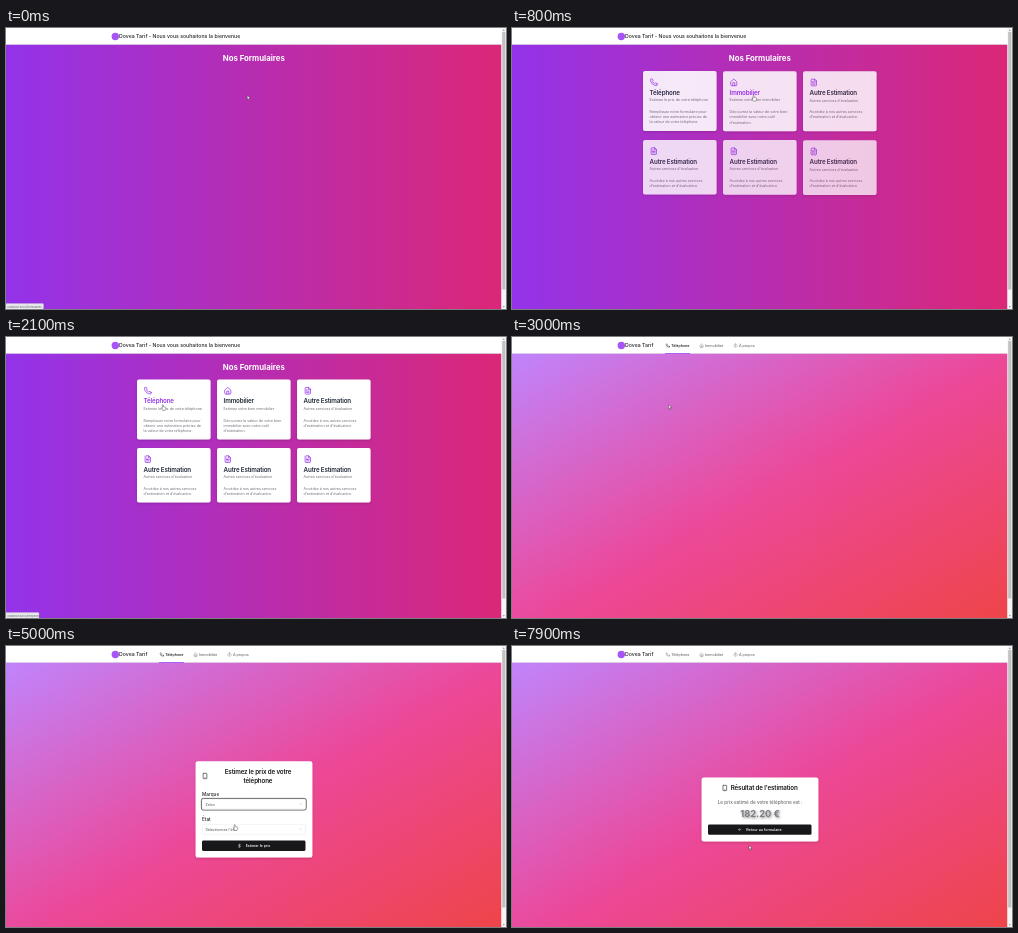
An HTML page for the animation above (8 s loop, 500 by 281 pixels).

```html
<!DOCTYPE html>
<html lang="fr">
<head>
<meta charset="utf-8">
<title>Formulaires d'estimation</title>
<style>
  html, body { margin: 0; width: 100%; height: 100%; overflow: hidden; background: #fff; }
  svg { display: block; width: 100%; height: 100%; font-family: Inter, "Open Sans", sans-serif; }
  text { white-space: pre; }
</style>
</head>
<body>
<svg viewBox="0 0 500 281">
  <defs>
    <linearGradient id="home" gradientUnits="userSpaceOnUse" x1="0" y1="0" x2="495.5" y2="0">
      <stop stop-color="#9333ea"/><stop offset="1" stop-color="#db2777"/>
    </linearGradient>
    <linearGradient id="form" gradientUnits="userSpaceOnUse" x1="127.2" y1="-55.1" x2="368.4" y2="370.1">
      <stop stop-color="#c084fc"/><stop offset=".5" stop-color="#ec4899"/><stop offset="1" stop-color="#ef4444"/>
    </linearGradient>
    <filter id="shade" x="-20%" y="-20%" width="140%" height="150%">
      <feDropShadow dx="0" dy="1" stdDeviation="1" flood-opacity=".18"/>
    </filter>
    <filter id="glow" x="-20%" y="-30%" width="140%" height="180%">
      <feDropShadow dx=".8" dy="1.1" stdDeviation=".8" flood-opacity=".5"/>
    </filter>
  </defs>
  <g id="scene"></g>
</svg>
<script>
const LOOP = 8000;
const INK = '#18181b', GREY = '#71717a', PURPLE = '#9333ea';
const SITE = 'Dovea Tarif';
const BRANDS = ['Zelvo', 'Norvik', 'Tamiro', 'Quelda', 'Brenoa', 'Fylos', 'Ormika', 'Pavely', 'Suneko', 'Lirox', 'Autre'];
const STATES = ['Neuf', 'Occasion', 'Bon état', 'Abîmé'];
const scene = document.getElementById('scene');

const clamp = x => Math.max(0, Math.min(1, x));
const easeOut = x => 1 - (1 - clamp(x)) ** 2;
const easeInOut = x => (x = clamp(x), x * x * (3 - 2 * x));
const during = (t, a, b) => t >= a && t < b;

// y is the vertical middle of the capitals
function label(str, x, y, size, { fill = INK, weight = 400, anchor = 'start', extra = '' } = {}) {
  return `<text x="${x}" y="${y + size * .36}" font-size="${size}" font-weight="${weight}" fill="${fill}" text-anchor="${anchor}" ${extra}>${str}</text>`;
}
const heading = (str, x, y, anchor, fill = '#1f2937') =>
  label(str, x, y, 6.25, { fill, anchor, weight: 600, extra: 'letter-spacing="-.156"' });
const rect = (x, y, w, h, fill, r = 0, extra = '') =>
  `<rect x="${x}" y="${y}" width="${w}" height="${h}" rx="${r}" fill="${fill}" ${extra}/>`;
const group = (content, opacity = 1, dy = 0) =>
  `<g opacity="${opacity}" transform="translate(0 ${dy})">${content}</g>`;
const rise = (content, p) => group(content, p, 5 * (1 - p));

// Icons live on a 24-unit grid and are placed by their centre
const ICONS = {
  phone: 'M22 17v3a2 2 0 0 1-2 2A18 18 0 0 1 2 4a2 2 0 0 1 2-2h3a2 2 0 0 1 2 2l1 4-2 2a16 16 0 0 0 6 6l2-2 4 1a2 2 0 0 1 2 2z',
  house: 'M3 10 12 2l9 8v10a2 2 0 0 1-2 2H5a2 2 0 0 1-2-2zM9 22v-9h6v9',
  file: 'M14 2H6a2 2 0 0 0-2 2v16a2 2 0 0 0 2 2h12a2 2 0 0 0 2-2V8zV8h6M8 13h8M8 17h8M8 9h2',
  info: 'M12 2a10 10 0 1 0 .01 0M12 11v6M12 7v.5',
  mobile: 'M7 2h10a2 2 0 0 1 2 2v16a2 2 0 0 1-2 2H7a2 2 0 0 1-2-2V4a2 2 0 0 1 2-2M12 18h.1',
  chevron: 'm6 9 6 6 6-6',
  dollar: 'M12 2v20M17 5H9.500a3.500 3.500 0 0 0 0 7h5a3.500 3.500 0 0 1 0 7H6',
  back: 'M12 5l-7 7 7 7M5 12h14'
};
function icon(name, x, y, size, color) {
  const k = size / 24;
  return `<path d="${ICONS[name]}" transform="translate(${x - size / 2} ${y - size / 2}) scale(${k})" fill="none" stroke="${color}" stroke-width="2.200" stroke-linecap="round" stroke-linejoin="round"/>`;
}

function frame(fill, title) {
  return rect(0, 0, 500, 281, '#fff') + rect(0, 16.5, 495.5, 264.5, `url(#${fill})`) +
    rect(0, 16.2, 495.5, .6, '#d9d5e0') +
    '<circle cx="109.300" cy="8.500" r="3.700" fill="#a855f7"/>' +
    label(title, 113, 8.6, 5.2, { weight: 500, fill: '#27272a' });
}

const scrollbar = () => rect(495.5, 0, 4.5, 281, '#f4f4f4') + rect(496.2, 4, 3.2, 257.5, '#c1c1c1') +
  '<path d="M496.800 2.800h2l-1-1.300zM496.800 278.200h2l-1 1.300z" fill="#777"/>';

const status = (path, w) => rect(-1, 275.6, w + 1, 6.4, '#e6e8eb', .8, 'stroke="#b8bbc0" stroke-width=".300"') +
  label('localhost:3000/' + path, 1.4, 278.6, 2.7, { fill: '#5f6368' });

const OTHER = ['file', 'Autre Estimation', 'Autres services d\'évaluation',
  ['Accédez à nos autres services', 'd\'estimation et d\'évaluation.']];
const CARDS = [
  ['phone', 'Téléphone', 'Estimez le prix de votre téléphone',
    ['Remplissez notre formulaire pour', 'obtenir une estimation précise de', 'la valeur de votre téléphone.']],
  ['house', 'Immobilier', 'Estimez votre bien immobilier',
    ['Découvrez la valeur de votre bien', 'immobilier avec notre outil', 'd\'estimation.']],
  OTHER, OTHER, OTHER, OTHER
];

function card([glyph, title, intro, lines], i, hovered) {
  const x = 131 + 80 * (i % 3), row = i > 2, y = row ? 111 : 42.5;
  return rect(x, y, 73.6, row ? 54.6 : 60, '#fff', 2, 'filter="url(#shade)"') +
    icon(glyph, x + 10.8, y + 11.2, 8, PURPLE) +
    heading(title, x + 6.6, y + 21.4, 'start', hovered ? PURPLE : undefined) +
    label(intro, x + 6.6, y + 29, 3.65, { fill: GREY }) +
    lines.map((s, n) => label(s, x + 6.6, y + 40.7 + 5.2 * n, 3.65, { fill: GREY })).join('');
}

function homePage(t) {
  const hovered = during(t, 300, 1350) ? 1 : t >= 1650 ? 0 : -1;
  let out = frame('home', SITE + ' - Nous vous souhaitons la bienvenue') +
    label('Nos Formulaires', 247.8, 30, 7.8, { fill: '#fff', weight: 700, anchor: 'middle' });
  CARDS.forEach((c, i) => {
    out += rise(card(c, i, i === hovered), easeOut((t - 330 - 25 * i) / 700));
  });
  if (t < 150) out += status('formulaires', 37.5);
  else if (during(t, 1000, 1400)) out += status('immobilier', 35);
  else if (t >= 1900) out += status('telephone', 33);
  return out + scrollbar();
}

function nav(active) {
  const tab = (glyph, str, x, on) => icon(glyph, x, 8.6, 4.2, on ? INK : GREY) +
    label(str, x + 3.4, 8.6, 3.65, { weight: 500, fill: on ? INK : GREY });
  return tab('phone', 'Téléphone', 155.8, active) + tab('house', 'Immobilier', 189.6) +
    tab('info', 'À propos', 223.5) + (active ? rect(153, 16, 25, .9, '#a855f7') : '');
}

function select(title, value, y, focused) {
  return label(title, 196, y - 10.1, 4.7, { weight: 500, fill: '#27272a' }) +
    (focused ? rect(195.4, y - 5.8, 104.8, 11.6, '#fff', 1.9, `stroke="${INK}" stroke-width=".700"`) : '') +
    rect(196.2, y - 5, 103.2, 10, '#fff', 1.4, 'stroke="#e0e0e4" stroke-width=".400"') +
    label(value, 199.4, y, 3.65, { fill: '#52525b' }) + icon('chevron', 294.6, y, 3.8, '#a1a1aa');
}

function button(glyph, str, y, iconX, textX, fill) {
  return rect(196, y - 5.2, 103.5, 10.4, fill, 1.4) + icon(glyph, iconX, y, 4, '#fff') +
    label(str, textX, y, 3.65, { fill: '#fff', weight: 500, anchor: 'middle' });
}

function menu(items, y, h, active, t, opens, closes) {
  if (!during(t, opens, closes + 120)) return '';
  const p = clamp((t - opens) / 150) * (1 - clamp((t - closes) / 120));
  const k = .95 + .05 * p, cy = y + h / 2;
  const rows = items.map((s, i) => {
    const ry = y + 5.2 + 8.3 * i;
    return (i === active ? rect(197, ry - 4.1, 101.500, 8.2, '#f4f4f5', 1) : '') +
      label(s, 206.5, ry, 3.65, { fill: '#27272a' });
  }).join('');
  return `<g opacity="${p}" transform="translate(247.750 ${cy - 2 * (1 - p)}) scale(${k}) translate(-247.750 ${-cy})">` +
    rect(196, y, 103.5, h, '#fff', 1.6, 'stroke="#e4e4e7" stroke-width=".400" filter="url(#shade)"') + rows + '</g>';
}

function formPage(t) {
  const shown = start => easeOut((t - start) / 500);
  const brand = t < 4700 ? 'Sélectionnez la marque' : BRANDS[0];
  const state = t < 6100 ? 'Sélectionnez l\'état' : STATES[1];
  const panel = rect(189.6, 115.2, 116.8, 96.4, '#fff', 2.2, 'filter="url(#shade)"') +
    icon('mobile', 199, 130, 6.4, INK) +
    heading('Estimez le prix de votre', 252, 126, 'middle', INK) +
    heading('téléphone', 252, 134.3, 'middle', INK) +
    rise(select('Marque', brand, 158.2, during(t, 4700, 5200)), shown(3150)) +
    rise(select('État', state, 183.3, during(t, 6100, 6700)), shown(3350)) +
    rise(button('dollar', 'Estimer le prix', 199.8, 233.5, 252, t >= 6400 ? '#2f2f32' : INK), shown(3400));
  return rise(panel, shown(3000)) +
    menu(BRANDS, 165, 98, t > 4050 ? 0 : -1, t, 3680, 4700) +
    menu(STATES, 190, 36, t < 5500 ? 0 : 1, t, 5200, 6100);
}

function resultPage(t) {
  const panel = rect(189.6, 131.5, 116.8, 64, '#fff', 2.2, 'filter="url(#shade)"') +
    icon('mobile', 212.8, 142, 6.4, INK) +
    heading('Résultat de l\'estimation', 252.2, 142, 'middle', INK) +
    label('Le prix estimé de votre téléphone est :', 248, 156, 4.7, { fill: '#52525b', anchor: 'middle' }) +
    group(label('182.20 €', 248, 167.3, 9.3, { fill: '#7b7b82', weight: 700, anchor: 'middle', extra: 'filter="url(#glow)"' }),
      easeOut((t - 7050) / 600)) +
    button('back', 'Retour au formulaire', 183.6, 227.8, 252, INK);
  return rise(panel, easeOut((t - 6900) / 500));
}

// Pointer stops: time, x, y of the tip; it glides between them
const STOPS = [
  [0, 241.3, 67.5], [950, 241.3, 67.5], [1850, 156.6, 67.8], [3000, 156.6, 67.8],
  [3600, 227.4, 161], [3850, 227.4, 161], [4350, 226, 170], [4650, 226, 170],
  [4950, 228.5, 178.800], [5250, 228.5, 178.800], [5750, 229, 203], [6200, 229, 203],
  [6480, 235, 200.4], [6850, 235, 200.4], [7500, 237, 199.5], [LOOP, 237, 199.5]
];
function pointer(t) {
  const i = STOPS.findIndex(s => s[0] > t);
  const [t0, x0, y0] = STOPS[i - 1], [t1, x1, y1] = STOPS[i];
  const p = easeInOut((t - t0) / (t1 - t0));
  const arrow = t < 300 || during(t, 1370, 1550) || during(t, 3000, 3500) ||
    during(t, 3850, 4850) || during(t, 5350, 6400) || t >= 6900;
  const shape = arrow
    ? 'M0 0v4l1-.900.700 1.700.800-.400-.700-1.600h1.300z'
    : 'M0 0q.700-.300.800.400v1.500l2 .500q.600.200.500.900l-.300 1.700-.500.600H.200L-1.200 3.500q-.200-.700.400-.500l.500.500V.400Q-.300.100 0 0z';
  return `<path d="${shape}" transform="translate(${x0 + (x1 - x0) * p} ${y0 + (y1 - y0) * p})" fill="#fff" stroke="#222" stroke-width=".400"/>`;
}

function render(t) {
  let page;
  if (t < 3000) page = homePage(t);
  else {
    const locked = during(t, 3680, 4700) || during(t, 5200, 6100);
    page = frame('form', SITE) + nav(t < 6900) + (locked ? '' : scrollbar()) +
      (t < 6900 ? formPage(t) : resultPage(t));
  }
  scene.innerHTML = page + pointer(t);
}

const start = performance.now();
function tick(now) {
  render(Math.max(0, now - start) % LOOP);
  requestAnimationFrame(tick);
}
render(0);
requestAnimationFrame(tick);
</script>
</body>
</html>
```
